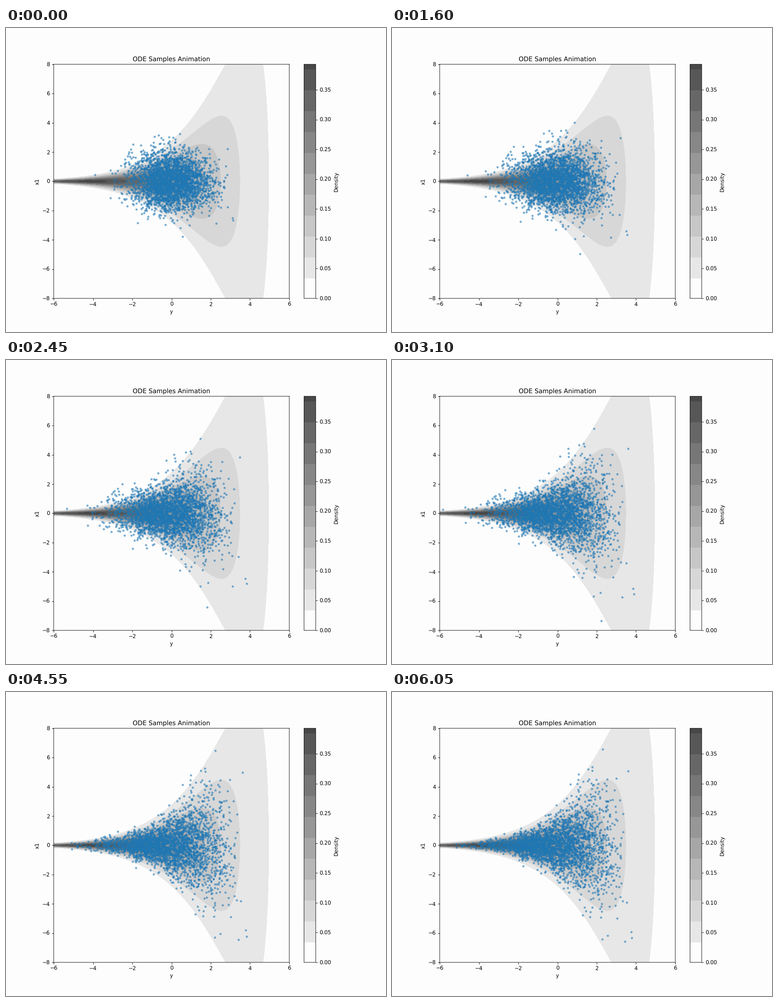
A matplotlib script that plays this animation: 837 by 669 pixels, repeating every 6.45 s.

```python
import numpy as np
import matplotlib.pyplot as plt
from matplotlib.animation import FuncAnimation
from matplotlib.colors import BoundaryNorm, ListedColormap

plt.rcParams.update({"path.snap": False, "text.hinting": "none"})

DPI = 83.7
PAPER = "#fdfdfd"
STEPS = 121      # moving part of the loop
FRAMES = 129     # includes the hold on the last pose
N = 3000


def schedule(u):
    """Signal and noise scale; the log signal-to-noise ratio is linear."""
    snr = np.exp(-3.4 + 8.6 * u)
    return np.sqrt(snr / (1 + snr)), np.sqrt(1 / (1 + snr))


# Funnel reached by the flow: y has a soft upper end, and the variance
# of x1 grows like exp(y) until it levels off
grid = np.linspace(-7.5, 5.5, 150)
log_prior = -(grid + 0.1)**2 / (2 * 1.7**2) - np.exp(2.5 * (grid - 3.5))
spread = np.exp(grid) / (1 + np.exp(grid) / 16)


def denoise(pts, a, s):
    """Posterior mean of the funnel sample given its noisy position."""
    y, x = pts[:, :1], pts[:, 1:]
    var = a**2 * spread + s**2
    logw = (log_prior - 0.5 * np.log(var)
            - (y - a * grid)**2 / (2 * s**2) - x**2 / (2 * var))
    w = np.exp(logw - logw.max(axis=1, keepdims=True))
    w /= w.sum(axis=1, keepdims=True)
    return np.column_stack([w @ grid, x[:, 0] * (w @ (a * spread / var))])


def solve_ode(pts):
    path = [pts]
    for k in range(STEPS):
        a, s = schedule(k / STEPS)
        a2, s2 = schedule((k + 1) / STEPS)
        clean = denoise(pts, a, s)
        pts = a2 * clean + s2 / s * (pts - a * clean)
        path.append(pts)
    return path


path = solve_ode(np.random.default_rng(0).standard_normal((N, 2)))

fig, ax = plt.subplots(figsize=(10, 7.993), dpi=DPI, facecolor=PAPER)
fig.subplots_adjust(left=0.1255, right=0.9005, bottom=0.1106, top=0.8806)
ax.set_facecolor(PAPER)

# Funnel density (square root) in flat grey bands
Y, X = np.meshgrid(np.linspace(-6, 6, 200), np.linspace(-8, 8, 200))
dens = np.sqrt(np.exp(-Y**2 / 18 - Y / 2 - X**2 * np.exp(-Y) / 2) / (6 * np.pi))
levels = [0, *(0.0338 + 0.0351 * np.arange(11)), dens.max()]
greys = [PAPER] + [str((231 - 16 * k) / 255) for k in range(11)]
bands = ax.contourf(Y, X, dens, levels=levels, cmap=ListedColormap(greys),
                    norm=BoundaryNorm(levels, len(greys)))

bar = fig.colorbar(bands, ax=ax, label="Density", spacing="proportional",
                   ticks=0.05 * np.arange(8), format="%.2f")
bar.minorticks_off()

dots = ax.scatter(*path[0].T, s=10, alpha=0.5, color="#1f77b4")
ax.set(xlim=(-6, 6), ylim=(-8, 8), xlabel="y", ylabel="x1",
       title="ODE Samples Animation")


def update(i):
    dots.set_offsets(path[min(i, STEPS)])
    return dots,


anim = FuncAnimation(fig, update, frames=FRAMES, interval=50, repeat=True)
plt.show()
```
